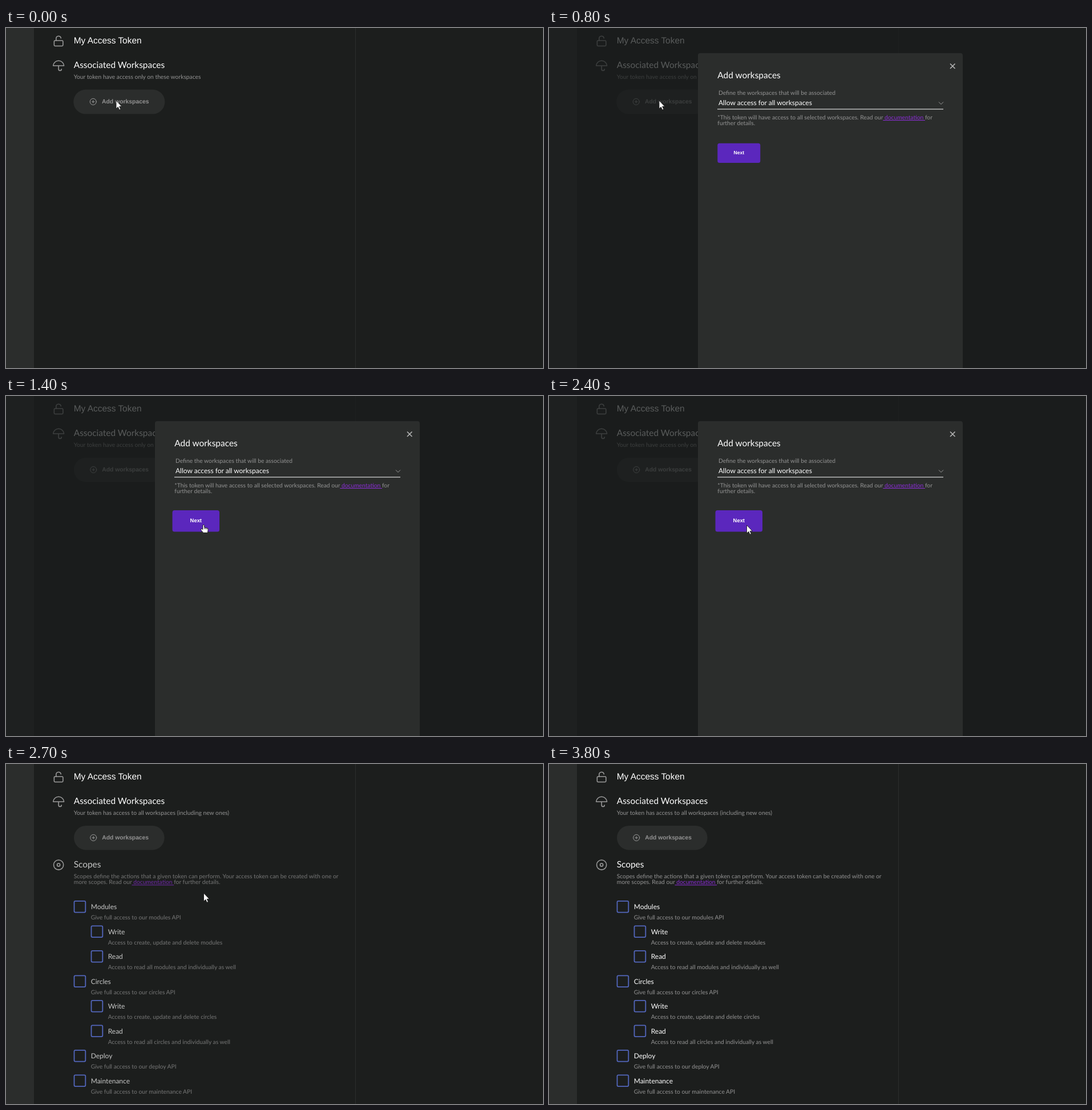
Recreate the animation shown at these times as an HTML page. Size 941 by 595 pixels, loop 4.1 s.

```html
<!DOCTYPE html>
<html lang="en">
<head>
<meta charset="utf-8">
<title>Access token</title>
<style>
  html, body { margin: 0; width: 100%; height: 100%; overflow: hidden; background: #1c1e1d; }
  svg { display: block; }
  text { font: 10.29px Lato, sans-serif; fill: #939393; white-space: pre; text-rendering: geometricPrecision; }
  .title { font-size: 15.43px; fill: #fff; }
  .option { font-size: 12px; fill: #fff; }
  .arial { font-family: "Liberation Sans", Arial, sans-serif; }
  .bold { font-weight: bold; }
  .link { fill: #8a2dd4; text-decoration: underline; }
  .icon { fill: none; stroke: #9c9c9c; stroke-width: 1.8; stroke-linecap: round; stroke-linejoin: round; }
  .scaled { transform-box: fill-box; transform-origin: center; }
</style>
</head>
<body>
<svg width="941" height="595" viewBox="0 0 941 595">
  <rect width="941" height="595" fill="#1c1e1d"/>
  <rect width="49" height="595" fill="#2b2d2c"/>
  <rect x="612" width="1" height="595" fill="#2b2d2c"/>

  <g class="icon" transform="translate(81.8 12.6) scale(.86)">
    <rect x="3" y="11" width="18" height="11" rx="2"/><path d="M7 11V7a5 5 0 0 1 9.9-1"/>
  </g>
  <text class="title arial" x="118.7" y="26.5">My Access Token</text>

  <path class="icon" transform="translate(81.8 55.6) scale(.86)" d="M23 12a11.05 11.05 0 0 0-22 0zm-5 7a3 3 0 0 1-6 0v-7"/>
  <text class="title" x="118.7" y="70">Associated Workspaces</text>
  <text id="access" x="118.7" y="89"></text>

  <g id="add" class="scaled">
    <rect x="119" y="108" width="158.6" height="42.4" rx="21.2" fill="#2b2d2c"/>
    <g class="icon" transform="translate(146.6 122.4) scale(.55)">
      <circle cx="12" cy="12" r="10"/><path d="M12 8v8M8 12h8"/>
    </g>
    <text class="arial bold" x="168.3" y="132.4">Add workspaces</text>
  </g>

  <g id="scopes">
    <g class="icon" transform="translate(81.8 166.2) scale(.86)">
      <circle cx="12" cy="12" r="10"/><circle cx="12" cy="12" r="3"/>
    </g>
    <g id="boxes" fill="none" stroke="#5367bd" stroke-width="1.8"></g>
    <g id="labels">
      <text class="title" x="118.7" y="181">Scopes</text>
      <text x="118.7" y="200">Scopes define the actions that a given token can perform. Your access token can be created with one or</text>
      <text x="118.7" y="210.3">more scopes. Read our<tspan class="link"> documentation </tspan>for further details.</text>
    </g>
  </g>

  <g id="modal">
    <rect width="941" height="595" fill="#1a1c1c" opacity=".72"/>
    <rect x="261" y="44" width="464" height="560" rx="4" fill="#2b2d2c"/>
    <path d="M703 62.5l8.5 8.5m0-8.5l-8.5 8.5" stroke="#b4b4b4" stroke-width="1.7"/>
    <text class="title" x="295.3" y="88">Add workspaces</text>
    <text x="297" y="117">Define the workspaces that will be associated</text>
    <text class="option" x="297" y="135">Allow access for all workspaces</text>
    <path d="M683 129.5l4 4 4-4" fill="none" stroke="#9c9c9c"/>
    <rect x="295" y="141.5" width="396" height="1" fill="#fff"/>
    <text x="295.3" y="160">*This token will have access to all selected workspaces. Read our<tspan class="link"> documentation </tspan>for</text>
    <text x="295.3" y="170.3">further details.</text>
    <g id="next" class="scaled">
      <rect x="295.3" y="201.7" width="75" height="34.2" rx="3.5" fill="#5b27bd"/>
      <text class="arial bold" x="332.8" y="221" text-anchor="middle" style="font-size:8.57px;fill:#fff">Next</text>
    </g>
  </g>

  <g id="cursor" stroke-linejoin="round">
    <path id="arrow" d="M0 0V14.2L3.3 11.2L5.6 16.3L7.9 15.2L5.6 10.3H9.8Z" fill="#fff" stroke="#111" stroke-width=".8"/>
    <path id="hand" d="M-1 0Q.5-1.3 1.6 .3V4.2L6.3 5Q8.3 5.4 8.2 7.5L7.4 13.3H-.4L-4.6 8.2Q-4.6 6.2-2.6 6.6L-1.2 7.8ZM2 5V7M4.2 5.3V7.2M6.3 5.6V7.4" fill="#fff" stroke="#111" stroke-width=".9"/>
    <path id="beam" d="M-1-5Q1.5-5 1.5-3V6.5Q1.5 8.5-1 8.5M4-5Q1.5-5 1.5-3M4 8.5Q1.5 8.5 1.5 6.5" fill="none" stroke="#fff" stroke-width="1.2"/>
  </g>
</svg>
<script>
const LOOP = 4100;
const byId = id => document.getElementById(id);

const scopeRows = [
  ["Modules", "Give full access to our modules API"],
  ["Write", "Access to create, update and delete modules", 1],
  ["Read", "Access to read all modules and individually as well", 1],
  ["Circles", "Give full access to our circles API"],
  ["Write", "Access to create, update and delete circles", 1],
  ["Read", "Access to read all circles and individually as well", 1],
  ["Deploy", "Give full access to our deploy API"],
  ["Maintenance", "Give full access to our maintenance API"],
];
scopeRows.forEach(([name, detail, indent = 0], row) => {
  const x = 118.7 + indent * 30, y = 239 + row * 43.5;
  byId("boxes").innerHTML += `<rect x="${x + .8}" y="${y + .8}" width="19.8" height="19.8" rx="2"/>`;
  byId("labels").innerHTML += `<text class="option" x="${x + 30}" y="${y + 15}">${name}</text>
    <text x="${x + 30}" y="${y + 33.3}">${detail}</text>`;
});

// Each track lists [start in ms, ...values], held until the next start.
const cursorTrack = [
  [0, "arrow", 193, 127], [100, "hand", 193, 127], [700, "arrow", 193, 127],
  [900, "arrow", 202, 136], [1000, "arrow", 222, 157], [1100, "arrow", 288, 197],
  [1200, "hand", 346, 226], [1900, "hand", 361, 226], [2400, "arrow", 346.5, 226],
  [3200, "beam", 346.5, 226], [3400, "arrow", 335, 208], [3500, "arrow", 285, 155],
  [3600, "arrow", 210, 76], [3700, "arrow", 136, 4], [3800, "none", 0, 0],
];
const addTrack = [[0, 1.01], [100, 1.02], [200, 1.025], [400, 1.03], [800, 1.01], [900, 1]];
const nextTrack = [[0, 1], [1300, 1.06], [1400, 1.1]];
const fadeTrack = [[0, 0], [2500, .25], [2600, .5], [2700, .75], [2900, 1]];

const held = (track, t) => track.findLast(([start]) => start <= t).slice(1);
const show = (id, visible) => byId(id).setAttribute("visibility", visible ? "visible" : "hidden");
const scale = (id, track, t) => byId(id).style.transform = `scale(${held(track, t)[0]})`;

function draw(t) {
  const granted = t >= 2500;
  byId("access").textContent = granted
    ? "Your token has access to all workspaces (including new ones)"
    : "Your token have access only on these workspaces";
  show("scopes", granted);
  show("modal", t >= 800 && !granted);
  byId("labels").style.opacity = held(fadeTrack, t)[0];
  scale("add", addTrack, t);
  scale("next", nextTrack, t);

  const [shape, x, y] = held(cursorTrack, t);
  for (const id of ["arrow", "hand", "beam"]) show(id, id === shape);
  byId("cursor").setAttribute("transform", `translate(${x} ${y})`);
}

function tick() {
  draw(performance.now() % LOOP);
  requestAnimationFrame(tick);
}
tick();
</script>
</body>
</html>
```
